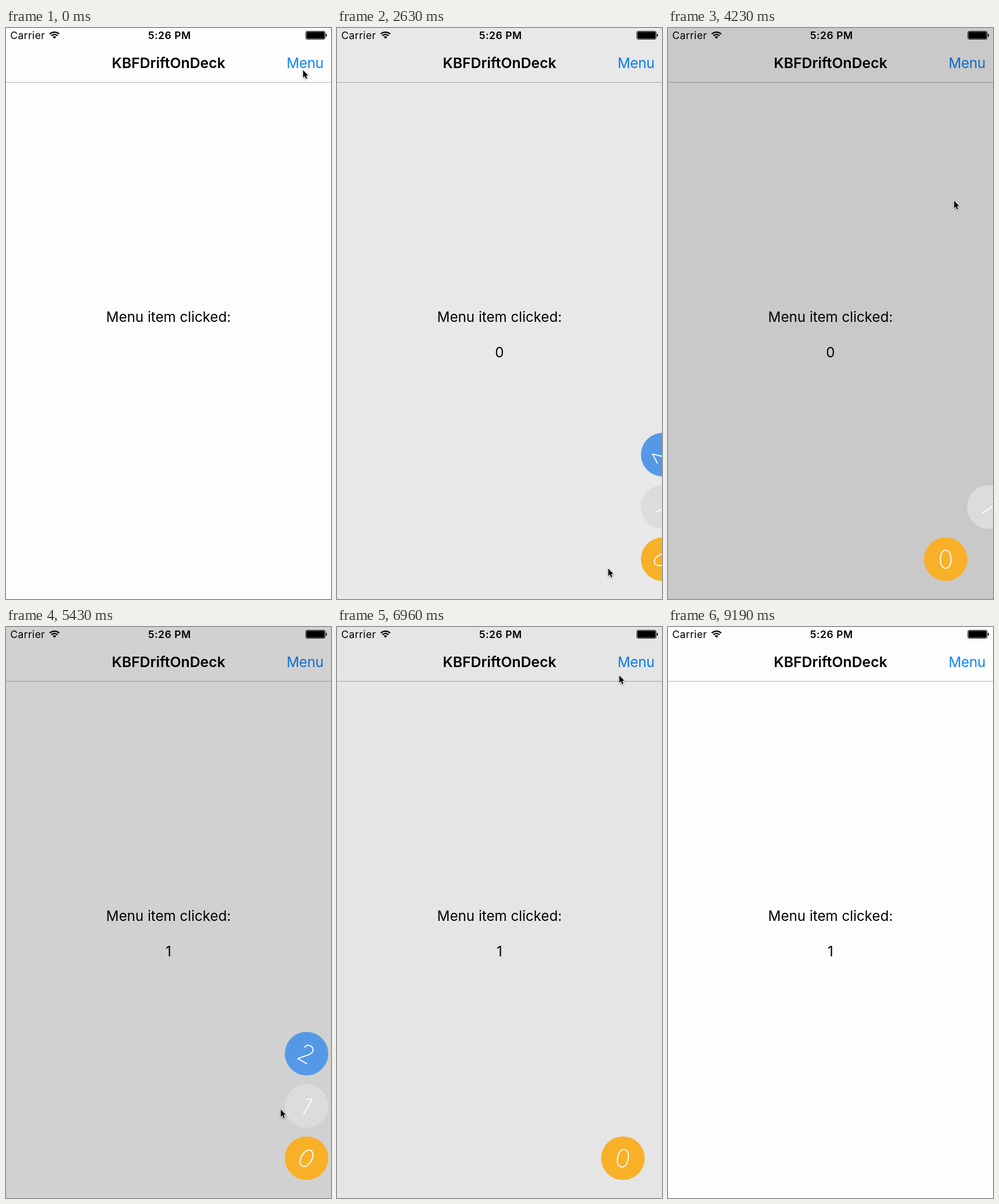
Recreate the animation shown at these times as an HTML page with a canvas. Size 560 px wide and 983 px high, loop 9820 ms.

```html
<!DOCTYPE html>
<html lang="en">
<head>
<meta charset="utf-8">
<title>Round menu demo</title>
<style>
  html, body { margin: 0; width: 100%; height: 100%; overflow: hidden; background: #fdfdfd; }
  canvas { display: block; width: 560px; height: 983px; }
</style>
</head>
<body>
<canvas id="stage" width="560" height="983"></canvas>
<script>
const W = 560, H = 983, LOOP = 9820;
const ctx = document.getElementById('stage').getContext('2d');
const FONT = 'Inter, Roboto, "Liberation Sans", sans-serif';

const BUTTONS = ['#f7b028', '#dcdcdc', '#5599e6'];
const OFF = 119;        // sideways travel of a button
const STAGGER = 239, ENTER = 200, LEAVE = 275;
const DIM = 0.266, DIM_TIME = 363;
const TRIP = 780;       // pointer time between the Menu link and a target

// The menu opens and closes; the pointer goes from the link to aim and back
const VISITS = [
  { open: 402, close: 2440, go: 1280, back: 2880, aim: { x: 467, y: 930 } },
  { open: 3950, close: 5340, go: 3945, back: 5800, aim: { x: 473, y: 830 } },
  { open: 6830, close: 7970, go: 6850, back: Infinity, aim: { x: 366.5, y: 425 } }
];
const HOME = { x: 511.5, y: 63 };
const EXIT = { x: 535, y: 990, from: 8040, to: 9190 };

const clamp = v => Math.max(0, Math.min(1, v));
const mix = (a, b, p) => a + (b - a) * p;
const progress = (t, start, time) => clamp((t - start) / time);
const easeInOut = p => p * p * (3 - 2 * p);
const easeOut = (p, power) => 1 - (1 - p) ** power;

function label(text, x, y, size, { weight = 400, align = 'center', color = '#000', gap = 0 } = {}) {
  ctx.font = `${weight} ${size}px ${FONT}`;
  ctx.letterSpacing = gap + 'px';
  ctx.textAlign = align;
  ctx.textBaseline = 'alphabetic';
  ctx.fillStyle = color;
  ctx.fillText(text, x, y);
}

function wifi(x, y) {
  ctx.strokeStyle = ctx.fillStyle = '#000';
  ctx.lineWidth = 2.3;
  const from = -Math.PI * 0.75, to = -Math.PI * 0.25;
  for (const r of [7.4, 11.5]) {
    ctx.beginPath();
    ctx.arc(x, y, r, from, to);
    ctx.stroke();
  }
  ctx.beginPath();
  ctx.moveTo(x, y);
  ctx.arc(x, y, 4.4, from, to);
  ctx.fill();
}

function battery() {
  ctx.strokeStyle = ctx.fillStyle = '#000';
  ctx.lineWidth = 0.8;
  ctx.beginPath();
  ctx.roundRect(516.5, 5.5, 33.5, 14, 2.5);
  ctx.stroke();
  ctx.beginPath();
  ctx.roundRect(517.6, 6.6, 31.3, 11.8, 1.4);
  ctx.roundRect(551, 10, 1.7, 5, 0.8);
  ctx.fill();
}

function page(choice) {
  ctx.fillStyle = '#fdfdfd';
  ctx.fillRect(0, 0, W, H);
  ctx.fillStyle = '#b2b2b2';
  ctx.fillRect(0, 93, W, 1);

  label('Carrier', 7.3, 19, 17.6, { align: 'left', gap: 0.35 });
  wifi(83.5, 18.6);
  label('5:26 PM', 281.7, 19, 17.6, { weight: 600, gap: 0.5 });
  battery();

  label('KBFDriftOnDeck', 280, 69, 24.8, { weight: 600 });
  label('Menu', 483.5, 69, 24.2, { align: 'left', color: '#0d84ff', gap: -0.25 });
  label('Menu item clicked:', 280, 506, 24.2);
  label(choice, 280, 567, 24.2);
}

function button(i, offset) {
  if (offset >= OFF) return;
  ctx.save();
  ctx.translate(478.5 + offset, 914.5 - 90 * i);
  ctx.fillStyle = BUTTONS[i];
  ctx.beginPath();
  ctx.arc(0, 0, 37.5, 0, Math.PI * 2);
  ctx.fill();
  ctx.rotate(offset / OFF * Math.PI / 2);
  label(String(i), 0, 15.7, 43, { weight: 200, color: '#fff' });
  ctx.restore();
}

function menu(t) {
  const visit = VISITS.find(v => t >= v.open && t < v.close + LEAVE);
  if (!visit) return;
  const gone = progress(t, visit.close, LEAVE);
  const dim = progress(t, visit.open, DIM_TIME) * (1 - gone);
  ctx.fillStyle = `rgba(0,0,0,${DIM * dim})`;
  ctx.fillRect(0, 0, W, H);
  BUTTONS.forEach((_, i) => {
    const shown = easeOut(progress(t, visit.open + i * STAGGER, ENTER), 2);
    button(i, OFF * Math.max(1 - shown, gone));
  });
}

function pointerAt(t) {
  const visit = VISITS.findLast(v => t >= v.go) || VISITS[0];
  const reach = easeInOut(progress(t, visit.go, TRIP))
    * (1 - easeOut(progress(t, visit.back, TRIP), 3));
  const leave = easeInOut(progress(t, EXIT.from, EXIT.to - EXIT.from));
  const lift = 9 * (1 - progress(t, 50, 250));
  return {
    x: mix(mix(HOME.x, visit.aim.x, reach ** 0.6), EXIT.x, leave),
    y: mix(mix(HOME.y + lift, visit.aim.y, reach), EXIT.y, leave)
  };
}

function pointer({ x, y }) {
  ctx.save();
  ctx.translate(x, y);
  ctx.beginPath();
  ctx.moveTo(0.4, 0.6);
  ctx.lineTo(0.4, 13.4);
  ctx.lineTo(3.2, 10.7);
  ctx.lineTo(5.3, 15.6);
  ctx.lineTo(7.4, 14.7);
  ctx.lineTo(5.3, 9.9);
  ctx.lineTo(9.1, 9.7);
  ctx.closePath();
  ctx.lineJoin = 'round';
  ctx.lineWidth = 1.8;
  ctx.strokeStyle = '#fff';
  ctx.shadowColor = 'rgba(0,0,0,0.4)';
  ctx.shadowBlur = 3;
  ctx.shadowOffsetY = 1;
  ctx.stroke();
  ctx.shadowColor = 'transparent';
  ctx.fillStyle = '#000';
  ctx.fill();
  ctx.restore();
}

function draw(t) {
  page(t < VISITS[0].close ? '' : t < VISITS[1].close ? '0' : '1');
  menu(t);
  if (t < EXIT.to) pointer(pointerAt(t));
}

const start = performance.now();
function tick() {
  draw((performance.now() - start) % LOOP);
  requestAnimationFrame(tick);
}
tick();
</script>
</body>
</html>
```
